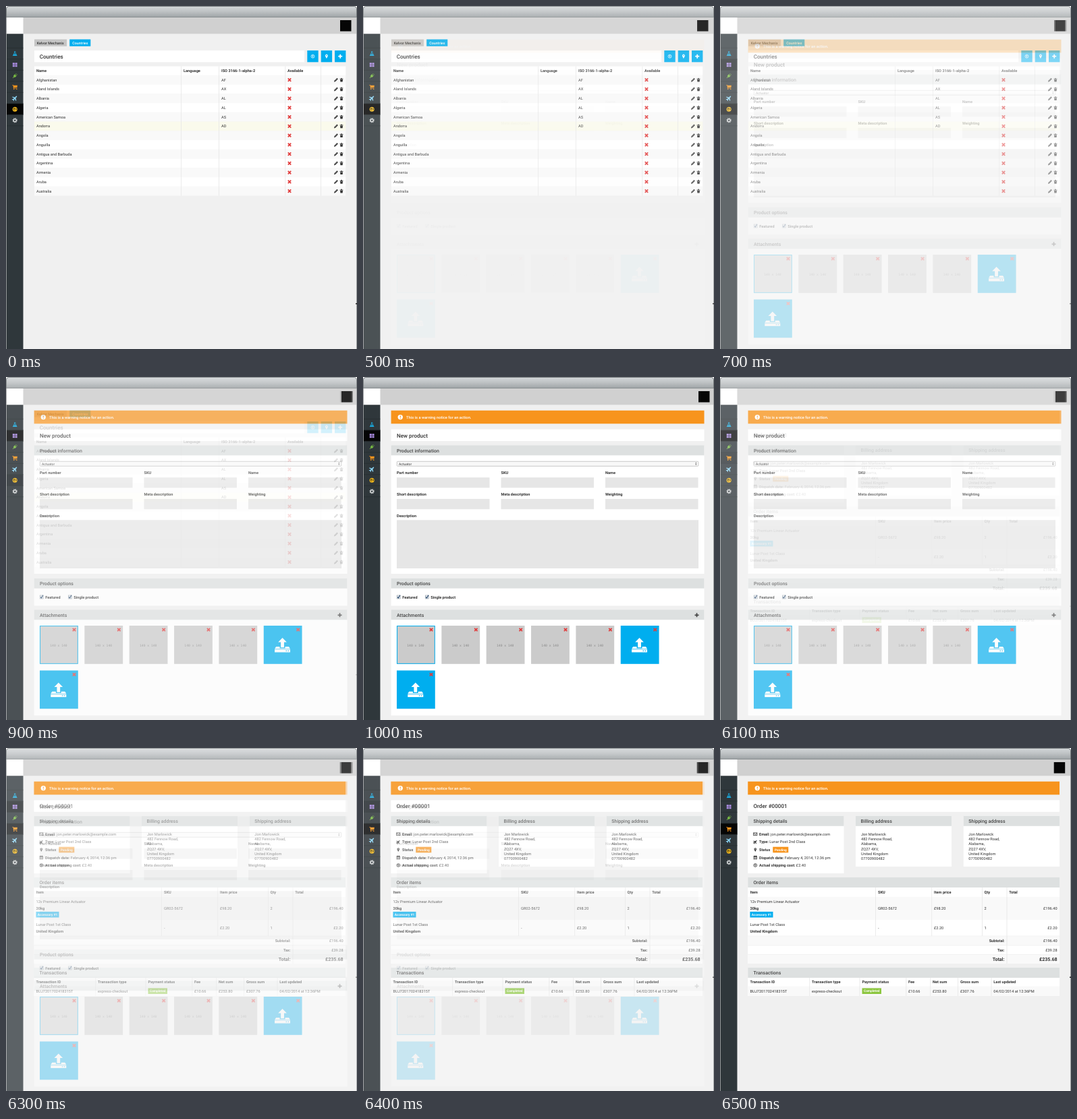
Animation of 520x509 px, one loop 8 s. Source, as an HTML page:

```html
<!DOCTYPE html>
<html lang="en">
<head>
<meta charset="utf-8">
<style>
  html, body { margin: 0; width: 100%; height: 100%; overflow: hidden; background: #fff; }
  svg { display: block; width: 100vw; height: 100vh; }
  text { font-family: Roboto, Arial, sans-serif; text-rendering: geometricPrecision; white-space: pre; }
  .mono { font-family: "DejaVu Sans Mono", monospace; }
</style>
</head>
<body>
<svg id="stage" viewBox="0 0 520 509"></svg>
<script>
const BLUE = '#00aeef', ORANGE = '#f7941d', RED = '#e13b3b', INK = '#333', BAR = '#dde0e0', STRIPE = '#f9f9f9';

// Boxes are given by their edges, text by its vertical centre.
const box = (x1, y1, x2, y2, fill, extra = '') =>
  `<rect x="${x1}" y="${y1}" width="${x2 - x1}" height="${y2 - y1}" fill="${fill}" ${extra}/>`;
const text = (x, y, str, { size = 5.65, weight = 400, fill = INK, anchor = 'start', cls = '' } = {}) =>
  `<text x="${x}" y="${y + size * 0.36}" font-size="${size}" font-weight="${weight}" fill="${fill}" text-anchor="${anchor}" class="${cls}">${str}</text>`;
const bold = (x, y, str, opts) => text(x, y, str, { weight: 700, ...opts });
const title = (x, y, str) => text(x, y, str, { size: 8.1, weight: 500 });
const heading = (x, y, str) => text(x, y, str, { size: 7, weight: 500, fill: '#444' });
const path = (d, fill, extra = '') => `<path d="${d}" fill="${fill}" ${extra}/>`;
const line = (d, color, width, extra = '') => path(d, 'none', `stroke="${color}" stroke-width="${width}" ${extra}`);
const at = (x, y, content, more = '') => `<g transform="translate(${x} ${y}) ${more}">${content}</g>`;
const columns = (xs, y1, y2) => xs.map(x => line(`M${x} ${y1}V${y2}`, '#e6e6e6', 0.8)).join('');

const cross = (x, y) => at(x, y, line('M-2.2-2.2L2.2 2.2M2.2-2.2L-2.2 2.2', RED, 1.7));
const plus = (x, y, color, r = 3) => at(x, y, line(`M${-r} 0H${r}M0 ${-r}V${r}`, color, 1.7));
const pencil = (x, y) => at(x, y, path('M-3 3L-2.4 .9 1.4-2.9 2.9-1.4-.9 2.4Z', INK) + line('M-1.6 1.1L1.3-1.8', '#aaa', 0.6));
const trash = (x, y) => at(x, y, path('M-2.5-2H-1V-2.8H1V-2H2.5V-1.2H-2.5ZM-2-.7H2L1.6 2.9H-1.6Z', INK));
const plane = color => path('M0-4.2Q.8-4 .8-2.5V-1L4 1V2L.8 1V2.8L2 3.8V4.4L0 4-2 4.4V3.8L-.8 2.8V1L-4 2V1L-.8-1V-2.5Q-.8-4 0-4.2Z', color, 'transform="rotate(45)"');
const cart = color => path('M-3.8-3.2H-2.2L-2-2.5H3.7L3.2 1H-1.5V1.7H3V2.3H-2.2L-2.7-2.5H-3.8Z', color) +
  `<g fill="${color}"><circle cx="-1.5" cy="3" r=".8"/><circle cx="2.6" cy="3" r=".8"/></g>`;
const pin = color => path('M0 3.2L-1.7 0A2 2 0 1 1 1.7 0ZM0-2A.8.8 0 1 0 0-.4.8.8 0 1 0 0-2Z', color, 'fill-rule="evenodd"');
const coin = color => `<circle r="2.4" fill="none" stroke="${color}" stroke-width=".8"/>` + line('M0-1.4V1.4M-.8-.7H.5', color, 0.9);

const sidebarIcons = [
  path('M-1.1-3.4H1.1V-1.3L3.5 3.2H-3.5L-1.1-1.3Z', '#1ba5d8') + path('M-.3-2.8H.3V-.8L1.1.7H-1.1L-.3-.8Z', '#2f373b'),
  path('M-3.4-3H-.3V-.3H-3.4ZM.3-3H3.4V-.3H.3ZM-3.4.3H-.3V3H-3.4ZM.3.3H3.4V3H.3Z', '#a98be0'),
  at(0, 0, path('M-1.8-1.5H1.8V.5Q1.8 2 .4 2.3V4.5H-.4V2.3Q-1.8 2-1.8.5Z', '#78b943') + line('M-1-1.5V-4M1-1.5V-4', '#78b943', 0.8), 'rotate(45)'),
  cart(ORANGE),
  plane('#8ad4f5'),
  '<circle r="3.5" fill="#e9b21c"/>' + path('M-2.4-1.5L-.4-2.3.3-1-1 .2-.5 1.6-1.6 1.8ZM1-1.8L2.7-.8 2.2 1 1 .6Z', '#5b4710'),
  '<circle r="2" fill="none" stroke="#d3d6d7" stroke-width="1.5"/><circle r="3.1" fill="none" stroke="#d3d6d7" stroke-width="1.1" stroke-dasharray="1.22"/>'
];

function frameWindow(active, avatarX, tickY) {
  const slotY = i => 62.3 + i * 16.5;
  return box(0, 10, 520, 509, '#f0f0f0') +
    path('M.5 17V4Q.5.5 4 .5H516Q519.5.5 519.5 4V17Z', 'url(#chrome)', 'stroke="#73787b"') +
    box(1, 17, 519, 41.3, '#d0d0d0') + box(1, 17, 25.5, 41.3, '#fff') +
    box(avatarX, 21, avatarX + 16.5, 37.5, '#060606') +
    box(1, 41.3, 25.5, 509, '#2f373b') + box(1, slotY(active), 25.5, slotY(active) + 16.5, '#050505') +
    sidebarIcons.map((icon, i) =>
      line(`M1 ${slotY(i)}H25.5`, '#252c2f', 0.7) + at(13.2, slotY(i) + 8.4, icon)).join('') +
    line(`M1 ${slotY(7)}H25.5`, '#252c2f', 0.7) +
    line('M.5 17V509M519.5 17V509', '#96999b', 1) +
    (tickY ? box(518, tickY, 520, tickY + 1.5, '#222') : '');
}

function warning(x1, x2) {
  return box(x1, 49.7, x2, 69.3, ORANGE) + '<circle cx="55.3" cy="59.6" r="3.7" fill="#fff"/>' +
    line('M55.3 57.3V60.3M55.3 61V62', ORANGE, 1) +
    text(64, 59.5, 'This is a warning notice for an action.', { size: 5.75, weight: 500, fill: '#fff' });
}

function panel(x1, x2, y1, y2, label, labelX) {
  return box(x1, y1, x2, y2, '#fff') + box(x1, y1, x2, y1 + 15, BAR) + heading(labelX, y1 + 7.7, label);
}

function countriesScreen() {
  const names = ['Afghanistan', 'Aland Islands', 'Albania', 'Algeria', 'American Samoa', 'Andorra', 'Angola',
    'Anguilla', 'Antigua and Barbuda', 'Argentina', 'Armenia', 'Aruba', 'Australia'];
  const codes = ['AF', 'AX', 'AL', 'AL', 'AS', 'AD'];
  const rowH = 13.75, top = 102.8;
  const rows = names.map((name, i) => {
    const y = top + i * rowH, mid = y + rowH / 2;
    const fill = i === 5 ? '#fafaec' : i % 2 ? '#fff' : STRIPE;
    return box(42, y, 503.3, y + rowH, fill) + text(45, mid, name) + text(319, mid, codes[i] || '') +
      cross(420, mid) + pencil(489, mid) + trash(497, mid);
  }).join('');
  return frameWindow(5, 495, 441) +
    box(42, 49.5, 90, 59.7, '#c5c5c5') + text(45.7, 54.6, 'Kelvor Mechanix', { size: 5.4, weight: 500 }) +
    box(94.2, 49.5, 125.3, 59.7, BLUE) + text(98.2, 54.6, 'Countries', { size: 5.4, weight: 500, fill: '#fff' }) +
    box(42, 66, 442, 83.3, '#fff') + title(49.7, 74.7, 'Countries') +
    [446.3, 466.7, 487].map(x => box(x, 66, x + 16.4, 83.3, BLUE)).join('') +
    at(454.5, 74.7, coin('#fff')) + at(474.9, 74.7, pin('#fff')) + plus(495.2, 74.7, '#fff') +
    box(42, 89.5, 503.3, top, '#fff') + rows + columns([259.5, 315.5, 413.8, 466.5], 89.5, top + 13 * rowH) +
    [[45, 'Name'], [263, 'Language'], [319, 'ISO 3166-1-alpha-2'], [417, 'Available']].map(([x, s]) => bold(x, 96.2, s)).join('');
}

function productScreen() {
  const fields = (y, labels) => labels.map((label, i) => {
    const x = 50 + i * 154.5;
    return bold(x, y, label) + box(x, y + 6.7, x + 137.5, y + 22, '#e6e6e6');
  }).join('');
  const checkbox = (x, label) => box(x, 324, x + 5, 329, '#e9eef2', 'stroke="#8d9aa5" stroke-width=".6"') +
    line(`M${x + 0.9} 326.4L${x + 2.2} 328L${x + 4.6} 323.8`, '#1d3e66', 1.1) + bold(x + 8, 326.7, label);
  const upload = path('M0-11L6.3-4.5H2.4V3.2H-2.4V-4.5H-6.3Z', '#fff') +
    path('M-9.5 2.2H-4V4.6H4V2.2H9.5L11.5 5.6H-11.5ZM-11.5 6.3H11.5V10.5H-11.5ZM5 7.8V9H6.5V7.8ZM8 7.8V9H9.5V7.8Z', '#fff', 'fill-rule="evenodd"');
  const tile = (col, y, isUpload) => {
    const x = 50 + col * 66.35;
    const body = isUpload
      ? box(x, y, x + 56.8, y + 56.8, BLUE) + at(x + 27.8, y + 29, upload)
      : box(x, y, x + 56.8, y + 56.8, '#cbcbcb') +
        text(x + 28, y + 29, '140 x 140', { size: 4.7, fill: '#888', anchor: 'middle', cls: 'mono' });
    const outline = !col && !isUpload ? box(50.5, y + 0.5, 106.3, y + 56.3, 'none', `stroke="${BLUE}"`) : '';
    return body + outline + cross(x + 51, y + 6);
  };
  return frameWindow(1, 497, 0) + warning(41.6, 505.5) +
    box(41.6, 77.6, 505.5, 95, '#fff') + title(50, 86.7, 'New product') +
    panel(41.6, 505.5, 101.3, 292, 'Product information', 50) +
    box(50.3, 125.3, 496.8, 132.3, '#f8f8f8', 'stroke="#b5b5b5" stroke-width=".7" rx="1"') +
    text(53, 128.8, 'Actuator', { size: 5 }) + path('M492.3 128.3L493.3 126.6 494.3 128.3ZM492.3 129.3L493.3 131 494.3 129.3Z', '#555') +
    fields(142.4, ['Part number', 'SKU', 'Name']) +
    fields(174.2, ['Short description', 'Meta description', 'Weighting']) +
    bold(50, 206, 'Description') + box(50, 212.3, 497, 284, '#e6e6e6') +
    panel(41.6, 505.5, 298.7, 339.5, 'Product options', 50) +
    checkbox(50.2, 'Featured') + checkbox(92.3, 'Single product') +
    panel(41.6, 505.5, 345.3, 502.3, 'Attachments', 50) + plus(494.5, 353.3, '#444') +
    [0, 1, 2, 3, 4, 5].map(col => tile(col, 369, col === 5)).join('') + tile(0, 435.5, true);
}

function orderScreen() {
  const L = 41.3, R = 503;
  const badge = (x1, y, x2, label, fill) => box(x1, y - 4.3, x2, y + 4.3, fill) +
    bold((x1 + x2) / 2, y, label, { size: 4.8, fill: '#fff', anchor: 'middle' });
  const address = x => ['Jon Marlowick', '482 Fennow Road,', 'Alabama,', 'ZQ27 4XV,', 'United Kingdom', '07700900482']
    .map((s, i) => text(x, 128 + i * 7.2, s)).join('');
  const heads = (y, list) => list.map(([x, s]) => bold(x, y, s)).join('');
  const detail = (y, icon, label, value) => at(52.3, y, icon) +
    `<text x="58" y="${y + 2}" font-size="5.65" fill="${INK}"><tspan font-weight="700">${label}</tspan> ${value}</text>`;
  const right = (x, y, s, opts) => text(x, y, s, { anchor: 'end', ...opts });
  const item = (y, values) => [234, 317, 391.5].map((x, i) => text(x, y, values[i])).join('') + right(499.6, y, values[3]);
  const envelope = box(-2.6, -1.9, 2.6, 1.9, 'none', `stroke="${INK}" stroke-width=".8"`) + line('M-2.5-1.5L0 .6 2.5-1.5', INK, 0.8);
  const calendar = box(-2.2, -2, 2.2, 2.3, 'none', `stroke="${INK}" stroke-width=".8"`) + line('M-2.2-1.2H2.2M-1.2-3V-1.5M1.2-3V-1.5M-1.3.6H1.3', INK, 0.9);
  const totals = [[286, 'Subtotal:', '£196.40', 5.65], [299.6, 'Tax:', '£39.28', 5.65], [313.3, 'Total:', '£235.68', 7.1]];

  return frameWindow(3, 494.7, 339.5) + warning(L, R) +
    box(L, 77.3, R, 94.8, '#fff') + title(49.5, 86.2, 'Order #00001') +
    panel(L, 183.5, 100.8, 186, 'Shipping details', 49.5) +
    panel(201, 343, 100.8, 176, 'Billing address', 208.5) +
    panel(360.8, R, 100.8, 176, 'Shipping address', 368.3) +
    detail(127.8, envelope, 'Email:', 'jon.peter.marlowick@example.com') +
    detail(139.3, at(0, 0, plane(INK), 'scale(.75)'), 'Type:', 'Lunar Post 2nd Class') +
    detail(151, at(0, 0, pin(INK), 'scale(.9)'), 'Status', '') + badge(78.3, 151, 101.3, 'Pending', ORANGE) +
    detail(162.6, calendar, 'Dispatch date:', 'February 4, 2014, 12:36 pm') +
    detail(174, coin(INK), 'Actual shipping cost:', '£2.40') +
    address(209) + address(368.3) +

    panel(L, R, 192, 320, 'Order items', 49.5) +
    box(L, 221, R, 255, STRIPE) + box(L, 279, R, 293, STRIPE) + box(L, 306.5, R, 320, STRIPE) +
    columns([230.5, 313.7, 388.5], 207, 279) + columns([425], 207, 320) +
    line(`M${L} 279H${R}M${L} 293H${R}M${L} 306.5H${R}`, '#ececec', 0.6) +
    heads(214, [[44.5, 'Item'], [234, 'SKU'], [317, 'Item price'], [391.5, 'Qty'], [428.3, 'Total']]) +
    text(44.5, 227.8, '12v Premium Linear Actuator') + bold(44.5, 237.5, '30kg') +
    badge(44.5, 247.2, 78.5, 'Accessory #1', BLUE) + item(238, ['GR02-5672', '£98.20', '2', '£196.40']) +
    text(44.5, 262.3, 'Lunar Post 1st Class') + bold(44.5, 271.7, 'United Kingdom') + item(266.8, ['-', '£2.20', '1', '£2.20']) +
    totals.map(([y, label, sum, size]) =>
      right(421.5, y, label, { size, weight: 700 }) + right(499.6, y, sum, { size, weight: size > 6 ? 700 : 400 })).join('') +

    panel(L, R, 326, 368, 'Transactions', 49.5) + box(L, 353.5, R, 368, STRIPE) +
    columns([132.7, 207, 275.8, 311.7, 352.5, 402], 341, 368) +
    heads(346.8, [[44.5, 'Transaction ID'], [136, 'Transaction type'], [210.5, 'Payment status'], [279, 'Fee'],
      [315, 'Net sum'], [356, 'Gross sum'], [405.3, 'Last updated']]) +
    [[44.5, 'BUJ7201702418315T'], [136, 'express-checkout'], [279, '£10.66'], [315, '£253.80'], [356, '£307.76'],
      [405.3, '04/02/2014 at 12:36PM']].map(([x, s]) => text(x, 360.7, s)).join('') +
    badge(210.5, 360.7, 239, 'Completed', '#8cc63f');
}

// Earlier screens lie on top, so each one fades away over its successor.
const stage = document.getElementById('stage');
stage.innerHTML = `<defs><linearGradient id="chrome" x2="0" y2="1">
  <stop stop-color="#d3d7d9"/><stop offset=".5" stop-color="#bcc0c2"/><stop offset="1" stop-color="#9da2a5"/></linearGradient></defs>` +
  [orderScreen, productScreen, countriesScreen].map(draw => `<g>${draw()}</g>`).join('');
const [order, product, countries] = stage.querySelectorAll(':scope > g');

const LOOP = 8000, STEP = 100, STEPS = 6;
const fadeIn = (time, start) => Math.min(1, Math.max(0, (Math.floor((time - start) / STEP) + 1) / STEPS));

function show(group, opacity) {
  group.style.opacity = opacity;
  group.style.display = opacity > 0 ? '' : 'none';
}

function render(now) {
  const time = now % LOOP;
  const toProduct = fadeIn(time, 500), toOrder = fadeIn(time, 6000);
  show(countries, 1 - toProduct);
  show(product, toProduct * (1 - toOrder));
  show(order, toOrder);
}

const start = performance.now();
function tick() {
  render(performance.now() - start);
  requestAnimationFrame(tick);
}
tick();
</script>
</body>
</html>
```
